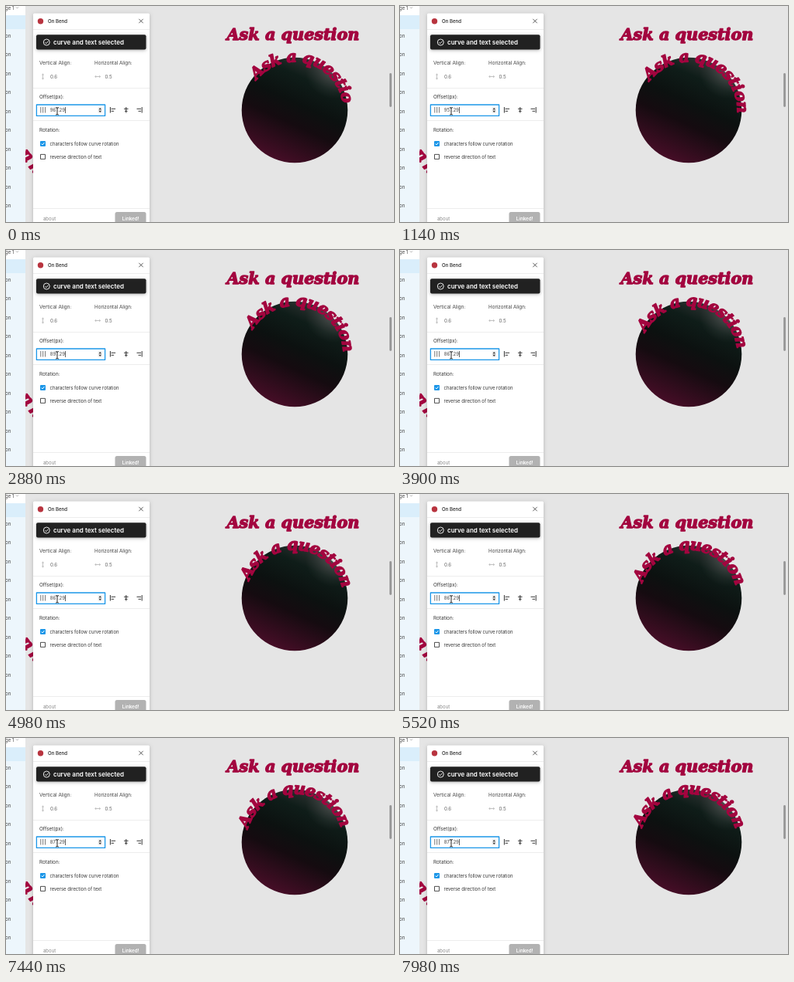
Animation, 500 px wide and 280 px high, one loop 8000 ms. Source, as an HTML page with a canvas:

```html
<!DOCTYPE html>
<html lang="en">
<head>
<meta charset="utf-8">
<title>Text on a curve</title>
<style>
html, body { margin: 0; width: 100%; height: 100%; overflow: hidden; background: #e5e5e5; }
canvas { display: block; width: 500px; height: 280px; }
</style>
</head>
<body>
<canvas id="stage"></canvas>
<script>
const W = 500, H = 280, LOOP = 8000;
const canvas = document.getElementById('stage');
const ctx = canvas.getContext('2d');
const dpr = window.devicePixelRatio || 1;
canvas.width = W * dpr;
canvas.height = H * dpr;

const SANS = 'Inter, Roboto, sans-serif';
const CRIMSON = '#a3053f';
const BLUE = '#1b96e8';
const PHRASE = 'Ask a question';
const DISC = { x: 372, y: 135, r: 68.3 };
const TEXT_W = 171, PATH_R = 67, BASE_R = 62.5;
const PRESS_BACK = 7380;

const clamp = (v, lo, hi) => Math.min(hi, Math.max(lo, v));

// The curve is redrawn in bursts of three steps, one burst every 480 ms
function burstProgress(t) {
  const u = Math.max(0, (t - 360) / 480);
  const k = Math.floor(u);
  const part = t < 360 ? 0 : Math.min(3, Math.floor((u - k) * 4) + 1) / 3;
  return Math.min(12, k + part);
}

// Angle of the last letter, in degrees clockwise from the top
function endAngle(t) {
  const back = clamp(Math.floor((t - PRESS_BACK) / 60) / 10, 0, 1);
  return 88.5 - 22.5 * (burstProgress(t) / 12) ** 1.465 + 1.7 * back;
}

function offsetText(t) {
  const presses = clamp(Math.floor((t - 960) / 293) + 1, 0, 10);
  return (967.29 - 10 * presses + (t >= PRESS_BACK ? 10 : 0)).toFixed(2);
}

function caretOn(t) {
  const idle = t >= 5100 && t < PRESS_BACK;
  return !idle || Math.floor((t - 4980) / 480) % 2 === 1;
}

function box(x, y, w, h, fill, r = 0) {
  ctx.fillStyle = fill;
  ctx.beginPath();
  ctx.roundRect(x, y, w, h, r);
  ctx.fill();
}

function raised(alpha, blur, ...args) {
  ctx.save();
  ctx.shadowColor = `rgba(0,0,0,${alpha})`;
  ctx.shadowBlur = blur * dpr;
  ctx.shadowOffsetY = dpr;
  box(...args);
  ctx.restore();
}

function dot(x, y, r, fill) {
  ctx.fillStyle = fill;
  ctx.beginPath();
  ctx.arc(x, y, r, 0, 7);
  ctx.fill();
}

function line(color, width, ...pts) {
  ctx.strokeStyle = color;
  ctx.lineWidth = width;
  ctx.beginPath();
  for (let i = 0; i < pts.length; i += 2) ctx.lineTo(pts[i], pts[i + 1]);
  ctx.stroke();
}

function label(text, x, y, size = 6, color = '#333', weight = 400) {
  ctx.font = `${weight} ${size}px ${SANS}`;
  ctx.fillStyle = color;
  ctx.textAlign = 'left';
  ctx.fillText(text, x, y);
}

const face = size => `italic bold ${size}px "DejaVu Serif", "Noto Serif", serif`;
ctx.font = face(100);
const SIZE = 100 * TEXT_W / ctx.measureText(PHRASE).width;
ctx.font = face(SIZE);
const letters = [...PHRASE].map((ch, i) => ({
  ch,
  mid: ctx.measureText(PHRASE.slice(0, i)).width + ctx.measureText(ch).width / 2
}));
const lastMid = letters[letters.length - 1].mid;

function ink(text, x, y, align) {
  ctx.font = face(SIZE);
  ctx.textAlign = align;
  ctx.fillStyle = ctx.strokeStyle = CRIMSON;
  ctx.lineWidth = 1.4;
  ctx.lineJoin = 'round';
  ctx.fillText(text, x, y);
  ctx.strokeText(text, x, y);
}

function turned(ch, x, y, angle, drop) {
  ctx.save();
  ctx.translate(x, y);
  ctx.rotate(angle);
  ink(ch, 0, drop, 'center');
  ctx.restore();
}

function drawLayers() {
  box(0, 0, 25, H, '#edf6fc');
  box(0, 0, 25, 12, '#fff');
  box(0, 12, 25, 18, '#daeefb');
  label('ge 1', -1, 4.5, 6, '#444');
  line('#888', 0.7, 13, 1.5, 14.5, 3, 16, 1.5);
  for (let y = 40.5; y < H; y += 24.5) label('on', -1, y, 6.2, '#444');
  ctx.save();
  ctx.beginPath();
  ctx.rect(25, 150, 10, 90);
  ctx.clip();
  turned('n', 27, 194, 0.9, 6);
  turned('k', 38, 210, 0.9, 6);
  ctx.restore();
}

function drawDisc() {
  const { x, y, r } = DISC;
  const g = ctx.createLinearGradient(342, 207, 405, 70);
  g.addColorStop(0, '#4f0e2b');
  g.addColorStop(0.4, '#150b10');
  g.addColorStop(0.58, '#0c1110');
  g.addColorStop(0.8, '#0f1d19');
  g.addColorStop(1, '#333736');
  dot(x, y, r, g);
  const glow = ctx.createRadialGradient(422, 84, 0, 422, 84, 36);
  glow.addColorStop(0, 'rgba(120,120,120,.5)');
  glow.addColorStop(1, 'rgba(90,90,90,0)');
  dot(x, y, r, glow);
}

function drawCurve(t) {
  const end = endAngle(t);
  for (const { ch, mid } of letters) {
    const a = end * Math.PI / 180 + (mid - lastMid) / PATH_R;
    const fits = mid < lastMid || end < 88;
    if (fits) turned(ch, DISC.x, DISC.y, a, -BASE_R);
  }
}

// side: -1 left, 0 centre, 1 right
function alignIcon(x, side) {
  line('#222', 0.9, x, 131, x, 138.5);
  for (const [y, w] of [[133.3, 5.5], [136.3, 3.5]]) {
    const mid = x - side * (1.2 + w / 2);
    line('#222', 0.9, mid - w / 2, y, mid + w / 2, y);
  }
}

function pointer(x, y) {
  line('#fff', 1.8, x, y - 4, x, y + 4);
  line('#111', 0.9, x, y - 4.5, x, y + 4.5);
  for (const s of [-1, 1])
    line('#111', 0.8, x - 2, y + s * 4.8, x, y + s * 4.2, x + 2, y + s * 4.8);
}

function drawField(t) {
  ctx.strokeStyle = BLUE;
  ctx.lineWidth = 1.3;
  ctx.strokeRect(39.4, 128, 88.2, 14.4);
  for (let x = 44.8; x < 52; x += 2.9) line('#666', 0.9, x, 131, x, 138.5);
  label(offsetText(t), 56.8, 137.3, 6, '#444');
  if (caretOn(t)) line('#222', 0.7, 76.5, 131, 76.5, 139);

  box(118.5, 131, 5.5, 8, '#efefef', 1);
  ctx.fillStyle = '#333';
  for (const s of [-1, 1]) {
    ctx.beginPath();
    ctx.moveTo(119.5, 135 + s * 0.8);
    ctx.lineTo(123, 135 + s * 0.8);
    ctx.lineTo(121.2, 135 + s * 3);
    ctx.fill();
  }
  pointer(66, 136.3);
}

function spanIcon(x, y, angle) {
  ctx.save();
  ctx.translate(x, y);
  ctx.rotate(angle);
  line('#aaa', 0.7, -3.2, 0, 3.2, 0);
  for (const s of [-1, 1]) line('#aaa', 0.7, s * 2, -1.5, s * 3.4, 0, s * 2, 1.5);
  ctx.restore();
}

function drawPanel(t) {
  raised(0.22, 5, 35, 9.5, 150, 290, '#fff', 1.5);
  dot(44.5, 19.7, 3.7, '#b8343f');
  label('On Bend', 54, 22, 6.1, '#222', 500);
  for (const s of [-1, 1]) line('#333', 0.8, 171.3, 19.5 - s * 2.7, 176.7, 19.5 + s * 2.7);
  for (const y of [30.5, 106.5, 148.5, 262.5]) line('#e9e9e9', 0.8, 35, y, 185, y);

  raised(0.3, 4, 39, 37.3, 141.5, 19.2, '#212121', 2);
  ctx.strokeStyle = '#fff';
  ctx.lineWidth = 0.9;
  ctx.beginPath();
  ctx.arc(52.3, 47, 4, 0, 7);
  ctx.stroke();
  line('#fff', 0.9, 50.3, 47.1, 51.8, 48.6, 54.4, 45.7);
  label('curve and text selected', 61, 49.8, 8.05, '#fff', 600);

  label('Vertical Align:', 43, 76.3, 6.35, '#444');
  label('Horizontal Align:', 114, 76.3, 6.25, '#444');
  label('0.6', 57, 93.8, 6.2, '#666');
  label('0.5', 127.5, 93.8, 6.2, '#666');
  spanIcon(47.5, 91.5, Math.PI / 2);
  spanIcon(118.2, 91.5, 0);

  label('Offset(px):', 43, 119.8, 6.35);
  drawField(t);
  for (const side of [-1, 0, 1]) alignIcon(154.8 + side * 20.4, side);

  label('Rotation:', 43, 163, 6.35);
  box(44, 175, 7, 7, BLUE, 1);
  line('#fff', 1, 45.6, 178.6, 47, 180, 49.5, 177);
  label('characters follow curve rotation', 56.5, 180.7, 5.95);
  ctx.strokeStyle = '#222';
  ctx.lineWidth = 0.8;
  ctx.strokeRect(44.5, 192.4, 6, 6);
  label('reverse direction of text', 56.5, 197.7, 5.95);

  label('about', 48, 277.5, 6, '#888');
  box(140.5, 267, 40, 18, '#b2b2b2', 2.5);
  label('Linked!', 149.8, 277.5, 6.2, '#fff', 600);
}

function draw(t) {
  ctx.setTransform(dpr, 0, 0, dpr, 0, 0);
  box(0, 0, W, H, '#e5e5e5');
  drawLayers();
  drawDisc();
  ink(PHRASE, 284.5, 44, 'left');
  drawCurve(t);
  box(494.2, 87, 2.8, 44, '#969696', 1.4);
  drawPanel(t);
}

const start = performance.now();
function tick() {
  draw((performance.now() - start) % LOOP);
  requestAnimationFrame(tick);
}
tick();
</script>
</body>
</html>
```
